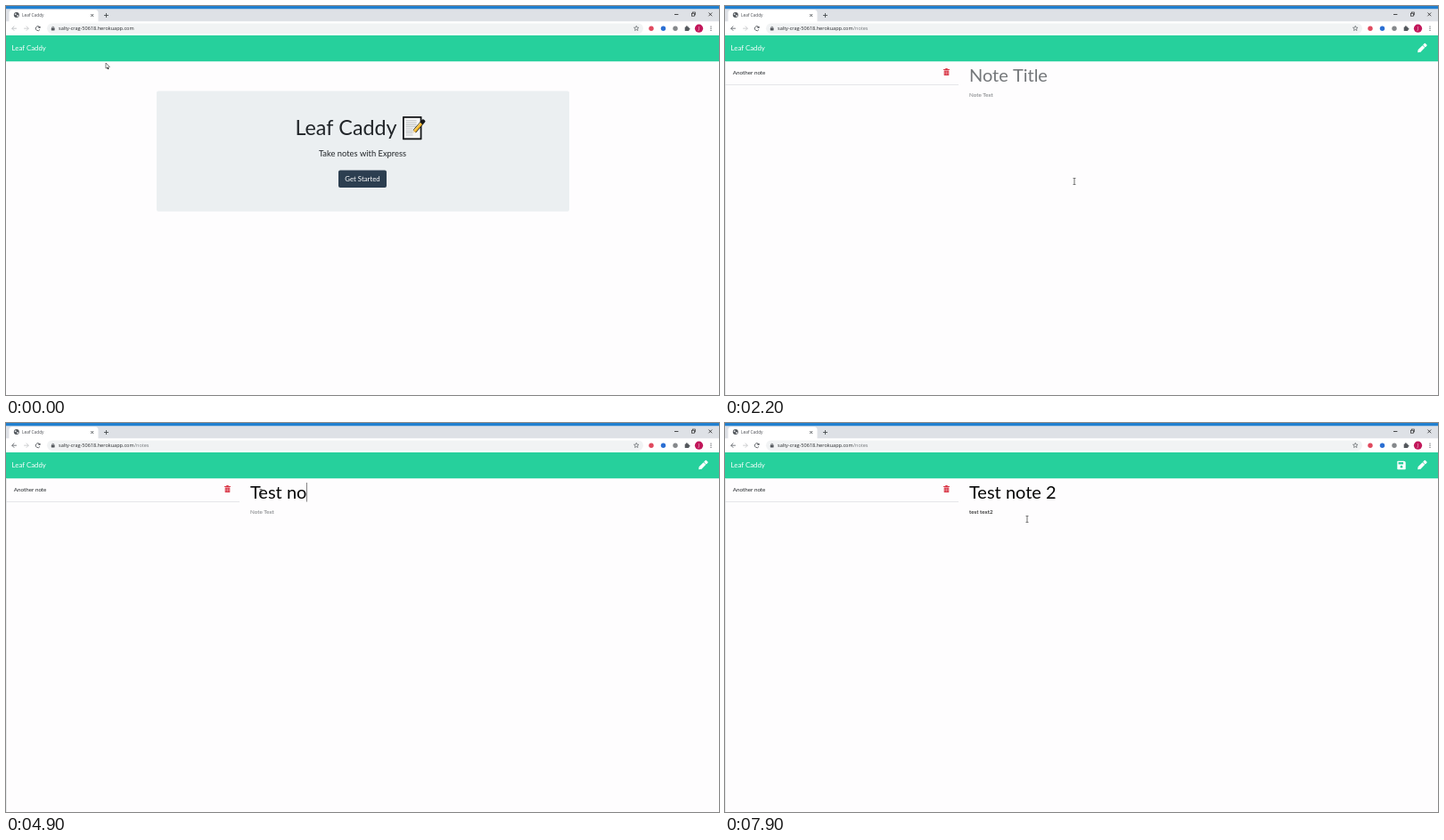
An HTML page with a canvas that plays this animation: 800x437 px, repeating every 8 s.

```html
<!DOCTYPE html>
<html lang="en">
<head>
<meta charset="utf-8">
<title>Leaf Caddy</title>
<style>
html, body { margin: 0; width: 100%; height: 100%; overflow: hidden; background: #fefdfe; }
canvas { display: block; width: 800px; height: 437px; }
</style>
</head>
<body>
<canvas id="stage"></canvas>
<script>
const W = 800, H = 437, LOOP = 8000, STEP = 100;
const canvas = document.getElementById('stage');
const ctx = canvas.getContext('2d');
const dpr = window.devicePixelRatio || 1;
canvas.width = W * dpr;
canvas.height = H * dpr;

const APP = 'Leaf Caddy';
const LATO = 'Lato, sans-serif';
const UI = '"Open Sans", sans-serif';
const REM = 6.25;
const GREEN = '#26d09c', INK = '#212529', CHROME = '#54585d';
const CLICK = 2000, OPENED = 2200;

const title = { text: 'Test note 2', hint: 'Note Title', y: 85.3, size: 20,
  focus: 4100, blur: 6200, start: 4500, end: 5100 };
const body = { text: 'test text2', hint: 'Note Text', y: 101.7, size: REM,
  focus: 6200, blur: LOOP, start: 6400, end: 7200 };

// The pointer rests between moves.
const home = { x: 112, y: 64 };
const moves = [
  { from: 200, to: 800, x: 118, y: 120 },
  { from: 800, to: 900, x: 239, y: 232 },
  { from: 900, to: 1300, x: 396, y: 193 },
  { from: 2100, to: 2200, x: 392, y: 197 },
  { from: 2300, to: 2700, x: 326, y: 103 },
  { from: 3600, to: 4000, x: 286, y: 78 },
  { from: 5200, to: 5500, x: 299, y: 76 },
  { from: 5700, to: 6100, x: 305, y: 101 },
  { from: 7300, to: 7900, x: 339, y: 108 }
];

const clamp = v => Math.max(0, Math.min(1, v));
const ease = k => k * k * (3 - 2 * k);

function pointer(t) {
  let { x, y } = home;
  for (const m of moves) {
    const k = ease(clamp((t - m.from) / (m.to - m.from)));
    x += (m.x - x) * k;
    y += (m.y - y) * k;
  }
  return { x, y };
}

function rect(x, y, w, h, color, r = 0) {
  ctx.fillStyle = color;
  ctx.beginPath();
  ctx.roundRect(x, y, w, h, r);
  ctx.fill();
}

function frame(x, y, w, h, color, width) {
  ctx.strokeStyle = color;
  ctx.lineWidth = width;
  ctx.strokeRect(x, y, w, h);
}

function disc(x, y, r, color) {
  ctx.fillStyle = color;
  ctx.beginPath();
  ctx.arc(x, y, r, 0, Math.PI * 2);
  ctx.fill();
}

function arc(x, y, r, from, to, color, width = 0.8) {
  ctx.strokeStyle = color;
  ctx.lineWidth = width;
  ctx.beginPath();
  ctx.arc(x, y, r, from, to);
  ctx.stroke();
}

function trace(points) {
  ctx.beginPath();
  for (const [x, y] of points) ctx.lineTo(x, y);
}

function line(points, color, width = 0.8) {
  trace(points);
  ctx.strokeStyle = color;
  ctx.lineWidth = width;
  ctx.stroke();
}

function poly(points, color) {
  trace(points);
  ctx.fillStyle = color;
  ctx.fill();
}

function label(str, x, y, size, color, family = LATO, align = 'left') {
  ctx.font = size + 'px ' + family;
  ctx.textAlign = align;
  ctx.fillStyle = color;
  ctx.fillText(str, x, y);
}

function at(x, y, draw, angle = 0) {
  ctx.save();
  ctx.translate(x, y);
  ctx.rotate(angle);
  draw();
  ctx.restore();
}

// n equal strokes crossing at one point
function spokes(x, y, r, color, n = 2, turn = 0) {
  for (let i = 0; i < n; i++) {
    const a = turn + i * Math.PI / n, dx = r * Math.cos(a), dy = r * Math.sin(a);
    line([[x - dx, y - dy], [x + dx, y + dy]], color);
  }
}

const plus = (x, y, r, color) => spokes(x, y, r, color);
const cross = (x, y, r, color) => spokes(x, y, r, color, 2, Math.PI / 4);

function arrow(x, y, dir, color) {
  const r = 2.6, tip = [x + r * dir, y];
  line([[x - r * dir, y], tip], color);
  line([[x, y - r], tip, [x, y + r]], color);
}

function star(x, y) {
  const pts = [];
  for (let i = 0; i <= 10; i++) {
    const r = i % 2 ? 1.3 : 2.9, a = i * Math.PI / 5 - Math.PI / 2;
    pts.push([x + r * Math.cos(a), y + r * Math.sin(a)]);
  }
  line(pts, CHROME, 0.65);
}

function drawTabs(loading) {
  const y = 10;
  rect(0, 0, W, 18, '#dee1e6');
  rect(0, 0, W, 3.2, '#2180d0');
  rect(3.5, 4.2, 100, 14, '#fff', [3.5, 3.5, 0, 0]);
  if (loading) {
    arc(12, y, 2.7, -Math.PI / 2, 0, '#777', 0.7);
  } else {
    disc(11.8, y, 3, '#50555a');
    disc(10.7, y - 0.7, 1, '#dfe1e3');
    disc(13, y + 1, 1, '#dfe1e3');
  }
  label(APP, 18, 12.2, 4.75, '#484b50', UI);
  cross(96.7, y + 0.5, 2.1, '#3c4043');
  plus(112.5, y + 0.5, 2.5, '#3c4043');
  spokes(752.2, 9.5, 2.2, '#222', 1);
  frame(770.4, 7, 3, 3, '#222', 0.6);
  rect(769.2, 8, 3.4, 3.4, '#dee1e6');
  frame(769.4, 8.2, 3, 3, '#222', 0.7);
  cross(790.3, 9.4, 2.7, '#222');
}

function drawToolbar(visited, loading) {
  const y = 25.2;
  rect(0, 17.3, W, 15.7, '#fff');
  arrow(9.3, y, -1, visited ? CHROME : '#b4b7ba');
  arrow(22.7, y, 1, '#c2c4c6');
  if (loading) {
    cross(36, y, 3, CHROME);
  } else {
    arc(35.8, y, 2.5, 0.5, Math.PI * 1.8, CHROME, 0.9);
    rect(36.4, y - 2.2, 2.2, 1.8, CHROME);
  }
  rect(46, y - 5.8, 669, 11.6, '#f1f3f4', 5.8);
  rect(50.8, y - 0.7, 3.8, 3, CHROME, 0.4);
  arc(52.7, y - 0.7, 1.2, Math.PI, 0, CHROME, 0.7);
  label('salty-crag-50618.herokuapp.com', 59, 27.2, 5.55, '#26282b', UI);
  if (visited) label('/notes', 144, 27.2, 5.55, '#74787c', UI);
  star(707.3, y);
  ['#e0495e', '#2b6fd3', '#85888b'].forEach((c, i) => disc(724 + i * 13.5, y, 2.7, c));
  rect(761.7, y - 1.8, 4.6, 4.7, CHROME, 0.5);
  disc(763.9, y - 2, 1, CHROME);
  disc(766.5, y + 0.5, 1, CHROME);
  disc(777.5, y, 4.6, '#c2185b');
  label('J', 777.5, y + 1.8, 5, '#fff', UI, 'center');
  for (let i = -1; i < 2; i++) disc(791, y + i * 2.1, 0.65, CHROME);
}

function drawMemo() {
  rect(445, 124, 21.5, 26.2, '#16181a', 0.6);
  rect(446.8, 125.8, 17.9, 22.6, '#f4f5f5');
  for (let i = 0; i < 8; i++) rect(448.6, 128.5 + i * 2.3, i < 4 ? 12 : 8, 0.7, '#a4a8aa');
  at(456.5, 143, () => {
    rect(2.2, -2.2, 17.5, 4.4, '#16181a', 1.4);
    poly([[0, 0], [3, -1.6], [3, 1.6]], '#f5dfb8');
    rect(3, -1.5, 11.5, 3, '#f7b92b');
    rect(3, -1.5, 11.5, 1, '#fbd56f');
  }, -0.86);
}

function drawHome(hover, focus) {
  rect(169, 95.6, 463, 135.2, '#ebeff1', 2);
  label(APP, 381.5, 145, REM * 3.73, INK, LATO, 'center');
  drawMemo();
  label('Take notes with Express', 400, 169.2, REM * 1.5, INK, LATO, 'center');
  if (focus) rect(372, 183.6, 56, 21.2, '#87929b', 2.5);
  rect(373, 184.5, 54, 19.4, hover ? '#1e2b37' : '#2c3e50', 2);
  label('Get Started', 400, 197.2, REM * 1.25, '#fff', LATO, 'center');
}

function drawTrash() {
  const red = '#d93848';
  rect(245, 70.9, 7, 1.1, red, 0.2);
  rect(247.2, 70, 2.6, 1.2, red, 0.3);
  rect(245.7, 72.5, 5.6, 5.5, red, 0.6);
  for (let i = 0; i < 3; i++) rect(246.7 + i * 1.55, 73.4, 0.5, 3.6, '#f5c4c9');
}

function drawPencil() {
  at(777.2, 52.2, () => {
    poly([[0, 0], [2.4, -1.9], [2.4, 1.9]], '#fff');
    rect(2.3, -1.9, 7.2, 3.8, '#fff');
    rect(10, -1.9, 3.3, 3.8, '#fff', 0.8);
  }, -Math.PI / 4);
}

function drawSave() {
  rect(754.3, 42.8, 9.4, 9.4, '#fff', [0.8, 2, 0.8, 0.8]);
  rect(755.6, 44, 5.5, 2.4, GREEN);
  disc(759, 49.2, 1.35, GREEN);
}

function typed(field, t) {
  if (t < field.start) return '';
  const k = clamp((t - field.start) / (field.end - field.start));
  return field.text.slice(0, 1 + Math.floor(k * (field.text.length - 1)));
}

function caretOn(field, t) {
  if (t < field.focus || t >= field.blur) return false;
  if (t >= field.start && t <= field.end) return true;
  return (t - (t > field.end ? field.end : field.focus)) % 1000 < 500;
}

function drawField(field, t) {
  const str = typed(field, t), { size, y } = field;
  label(str || field.hint, 274, y, size, str ? '#050505' : '#74777a');
  if (!caretOn(field, t)) return;
  const x = 274 + (str ? ctx.measureText(str).width : 0);
  rect(x, y - size * 0.92, 0.6, size * 1.08, '#333');
}

function drawNotes(t) {
  rect(0, 62, 0.7, H - 62, '#dfe1e3');
  rect(0, 88, 262, 0.7, '#dcdfe2');
  label('Another note', 8.8, 77.4, REM, INK);
  drawTrash();
  drawPencil();
  if (t >= body.start) drawSave();
  drawField(title, t);
  drawField(body, t);
}

function drawBeam() {
  rect(-0.35, -3.5, 0.7, 7, '#333');
  for (const y of [-3.5, 3.5]) rect(-1.5, y - 0.3, 3, 0.6, '#333');
}

function drawHand() {
  for (const [color, grow] of [['#222', 0.5], ['#fff', 0]]) {
    rect(-0.8 - grow, -grow, 1.6 + 2 * grow, 6 + 2 * grow, color, 0.8);
    rect(-2 - grow, 3.6 - grow, 5.4 + 2 * grow, 4.6 + 2 * grow, color, 1.4);
  }
}

function drawArrow() {
  const head = [[0, 0], [0, 6], [4.3, 4.5], [0, 0]];
  line([[1.6, 4], [2.8, 7]], '#222', 1.5);
  poly(head, '#fff');
  line(head, '#222', 0.6);
}

function render(t) {
  const loading = t >= CLICK && t < OPENED;
  const onNotes = t >= OPENED;
  const p = pointer(t);
  const hover = !onNotes && Math.abs(p.x - 400) < 27 && Math.abs(p.y - 194) < 10;
  ctx.setTransform(dpr, 0, 0, dpr, 0, 0);
  rect(0, 0, W, H, '#fefdfe');
  drawTabs(loading);
  drawToolbar(t >= CLICK, loading);
  rect(0, 33, W, 29.2, GREEN);
  label(APP, 6.6, 50.3, REM * 1.25, '#fff');
  if (onNotes) drawNotes(t);
  else drawHome(hover, t >= CLICK - STEP);
  at(p.x, p.y, onNotes ? drawBeam : hover ? drawHand : drawArrow);
}

const began = performance.now();
function tick() {
  const t = (performance.now() - began) % LOOP;
  render(Math.floor(t / STEP) * STEP);
  requestAnimationFrame(tick);
}
tick();
</script>
</body>
</html>
```
